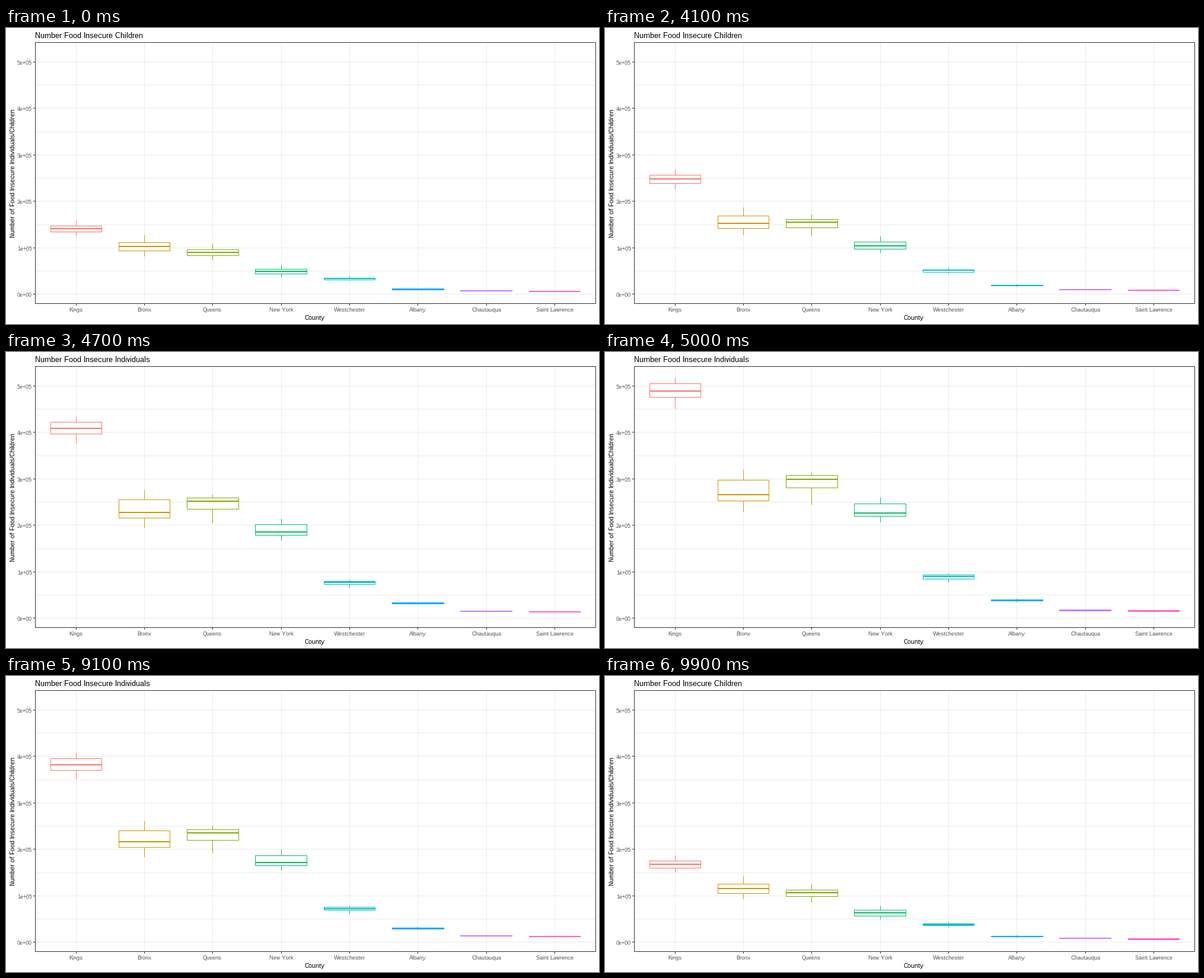
A matplotlib script for the animation above (10 s loop, 1000x500 px).

```python
import matplotlib.pyplot as plt
import numpy as np
from matplotlib.animation import FuncAnimation
from matplotlib.patches import Rectangle

plt.rcParams.update({"font.family": "Liberation Sans",
                     "text.hinting": "native", "text.hinting_factor": 1})

WIDTH, HEIGHT, DPI = 1000, 500, 72
FRAMES, INTERVAL = 100, 100
HOLD, STEPS = 38, 13
HALF_LOOP = FRAMES // 2
LEFT, RIGHT, TOP, BOTTOM = 49, 994, 24, 465
FIRST_X, SPACING, HALF_BOX = 117.9, 115.28, 43.25
ZERO_Y, PX_PER_THOUSAND = 449.4, 0.785
GRID, DARK, LABEL = "#EBEBEB", "#333333", "#4D4D4D"

# Thousands: median of children, median of individuals, reach of the
# individuals' whiskers below and above their median.
COUNTIES = {
    "Kings": ("#F8766D", 140.6, 488.4, 37, 28),
    "Bronx": ("#CD9600", 102.4, 265.5, 36, 54),
    "Queens": ("#7CAE00", 89.7, 299.2, 54, 14),
    "New York": ("#00BE67", 48.9, 226, 19, 33),
    "Westchester": ("#00BFC4", 33.6, 89.7, 13, 6),
    "Albany": ("#00A9FF", 10.2, 38, 2.5, 3),
    "Chautauqua": ("#C77CFF", 7.1, 16.7, 1, 1.7),
    "Saint Lawrence": ("#FF61CC", 5.6, 15.4, 1, 1.2),
}


def to_row(thousands):
    return ZERO_Y - PX_PER_THOUSAND * thousands


def five_numbers(median, below, above, lower_hinge, upper_hinge):
    """Whiskers, hinges and median from top to bottom; hinges are given as
    fractions of the whisker reach."""
    return [median + above, median + above * upper_hinge, median,
            median - below * lower_hinge, median - below]


def summaries(child_median, median, below, above):
    """The children's spread is half as wide and nearly symmetric."""
    child_spread = (below + above) / 2
    children = five_numbers(child_median, .45 * child_spread, .55 * child_spread, .45, .35)
    individuals = five_numbers(median, below, above, .35, .6)
    return to_row(np.array([children, individuals]))


fig = plt.figure(figsize=(WIDTH / DPI, HEIGHT / DPI), dpi=DPI, facecolor="white")
ax = fig.add_axes([0, 0, 1, 1])
ax.set_xlim(0, WIDTH)
ax.set_ylim(HEIGHT, 0)
ax.axis("off")


def line(x0, y0, x1, y1, color, z):
    """One-pixel line through the centres of the given pixels."""
    return ax.plot([x0 + .5, x1 + .5], [y0 + .5, y1 + .5], color=color, lw=1,
                   solid_capstyle="projecting", zorder=z, snap=False)[0]


def outline(x0, y0, x1, y1, edge, fill, z):
    return ax.add_patch(Rectangle((x0 + .5, y0 + .5), x1 - x0, y1 - y0, lw=1,
                                  edgecolor=edge, facecolor=fill, zorder=z,
                                  joinstyle="miter", snap=False))


def text(x, y, content, size, color="black", ha="center", rotation=0):
    return ax.text(x, y, content, size=size, color=color, ha=ha, va="baseline",
                   rotation=rotation, rotation_mode="anchor")


def draw_scales():
    for i in range(11):
        y = round(to_row(50 * i))
        line(LEFT, y, RIGHT, y, GRID, 1)
        if i % 2 == 0:
            line(LEFT - 3, y, LEFT - 1, y, DARK, 6)
            text(44, y + 5, f"{i // 2}e+0{5 if i else 0}", 9, LABEL, "right")
    for i, name in enumerate(COUNTIES):
        x = round(FIRST_X + i * SPACING)
        line(x, TOP, x, BOTTOM, GRID, 1)
        line(x, BOTTOM + 1, x, BOTTOM + 3, DARK, 6)
        text(x, 479, name, 9, LABEL)
    outline(LEFT, TOP, RIGHT, BOTTOM, DARK, "none", 6)
    text(521, 493, "County", 11)
    text(15, 245.5, "Number of Food Insecure Individuals/Children", 11, rotation=90)


class BoxGlyph:
    def __init__(self, index, color, *stats):
        self.children, self.individuals = summaries(*stats)
        center = FIRST_X + index * SPACING
        x, x0, x1 = round(center), round(center - HALF_BOX), round(center + HALF_BOX)
        self.upper = line(x, 0, x, 0, color, 3)
        self.lower = line(x, 0, x, 0, color, 3)
        self.box = outline(x0, 0, x1, 0, color, "white", 4)
        self.median = ax.add_patch(Rectangle((x0, 0), x1 - x0 + 1, 2, lw=0,
                                             facecolor=color, zorder=5, snap=False))

    def update(self, share):
        rows = self.children + (self.individuals - self.children) * share
        high, q3, mid, q1, low = (round(r) for r in rows)
        self.upper.set_ydata([high + .5, q3 + .5])
        self.lower.set_ydata([q1 + .5, low + .5])
        self.box.set_y(q3 + .5)
        self.box.set_height(q1 - q3)
        self.median.set_y(mid - 1)


draw_scales()
title = text(49, 17, "", 13, ha="left")
glyphs = [BoxGlyph(i, *county) for i, county in enumerate(COUNTIES.values())]


def update(frame):
    returning, local = divmod(frame, HALF_LOOP)
    step = max(0, local - HOLD + 1)
    share = step / STEPS
    switched = step > (STEPS + 1) // 2
    group = "Individuals" if switched != bool(returning) else "Children"
    title.set_text(f"Number Food Insecure {group}")
    for glyph in glyphs:
        glyph.update(1 - share if returning else share)
    return []


animation = FuncAnimation(fig, update, frames=FRAMES, interval=INTERVAL,
                          repeat=True, repeat_delay=0, blit=False)
plt.show()
```
